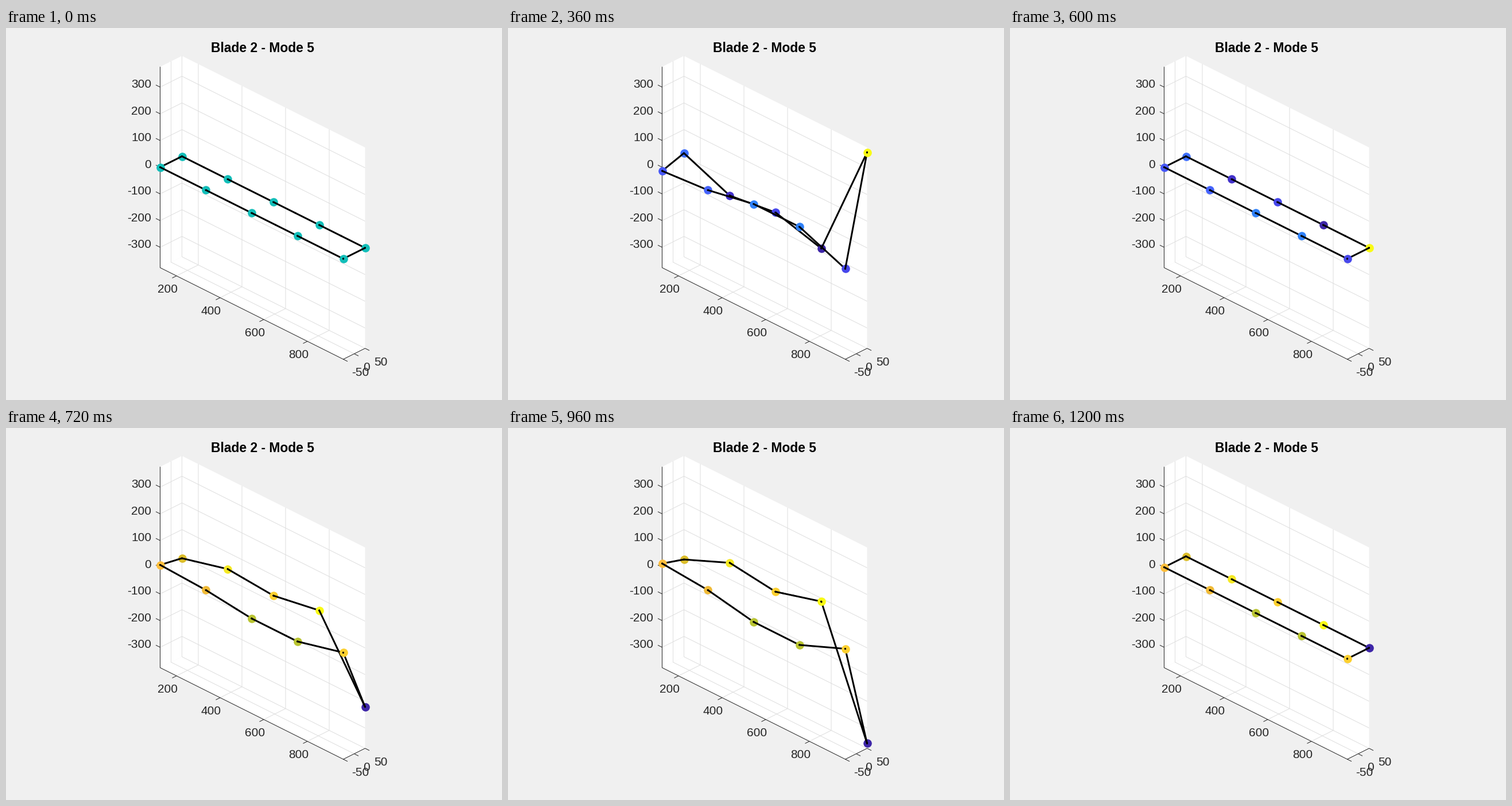
Recreate the animation shown at these times as a matplotlib script. Size 864 by 648 pixels, loop 1.26 s.

```python
import numpy as np
import matplotlib.pyplot as plt
from matplotlib.animation import FuncAnimation

W, H, DPI = 864, 648, 72
STEPS = 21
INK = "#262626"
GRID = "#dedede"
TEAL = "#12beb9"

plt.rcParams["font.family"] = "Liberation Sans"
fig = plt.figure(figsize=(W / DPI, H / DPI), dpi=DPI, facecolor="#f0f0f0")
ax = fig.add_axes([0, 0, 1, 1])
ax.set_xlim(0, W)
ax.set_ylim(H, 0)
ax.axis("off")

# Projected box: a bottom corner and the three edge vectors in pixels.
CORNER = np.array([268.5, 417.5])
EX = np.array([319, 159.5])
EY = np.array([38, -19])
EZ = np.array([0, -350])


def at(x, y, z):
    """Stage position of box fractions x, y, z."""
    return CORNER + x * EX + y * EY + z * EZ


def line(points, color, width=1.0, z=1):
    xs, ys = zip(*points)
    ax.plot(xs, ys, color=color, lw=width, zorder=z, solid_capstyle="butt")


def label(x, middle, text, ha, size=20.83, color=INK, **kw):
    ax.text(x, middle + 0.36 * size, text, ha=ha, va="baseline",
            fontsize=size, color=color, zorder=2, **kw)


def draw_box():
    walls = [
        [(0, 0, 0), (0, 1, 0), (0, 1, 1), (0, 0, 1)],
        [(0, 1, 0), (1, 1, 0), (1, 1, 1), (0, 1, 1)],
        [(0, 0, 0), (1, 0, 0), (1, 1, 0), (0, 1, 0)],
    ]
    for wall in walls:
        ax.fill(*zip(*[at(*p) for p in wall]), color="white", lw=0, zorder=0)

    back = np.array([-7.5, -3.75])
    front = np.array([-7.5, 3.75])
    for k in range(-3, 4):
        z = 0.5 + k * 46.5 / 350
        line([at(0, 0, z), at(0, 1, z), at(1, 1, z)], GRID)
        tick = at(0, 0, z)
        line([tick, tick + back], INK)
        label(253, 236.5 - 46.5 * k, str(100 * k).replace("\u2212", "-"),
              "right")
    for k in range(4):
        x = (28.5 + 76 * k) / 319
        line([at(x, 0, 0), at(x, 1, 0), at(x, 1, 1)], GRID)
        tick = at(x, 0, 0)
        line([tick, tick + front], INK)
        label(281.5 + 75.9 * k, 454 + 37.9 * k, str(200 + 200 * k), "center")
    for k, name in enumerate(["-50", "0", "50"]):
        y = k / 2
        if k:
            line([at(1, y, 0), at(0, y, 0), at(0, y, 1)], GRID)
        tick = at(1, y, 0)
        line([tick, tick - back], INK)
        label(602.5 + 19.2 * k, 599 - 9.4 * k, name, "left")
    line([at(0, 0, 1), at(0, 0, 0), at(1, 0, 0), at(1, 1, 0)], INK, z=1.5)
    label(447.3, 33.5, "Blade 2 - Mode 5", "center", 22.92, "black",
          weight="bold")


draw_box()

# Nodes run along the near edge, then back along the far edge.
ALONG = np.array([0, 1, 2, 3, 4, 4, 3, 2, 1, 0]) / 4
SIDE = np.repeat([0, 1], 5)
SHAPE = np.array([-6.8, 0, 16.4, 16.6, -18.3, 175, -43, -19, -30, 5.8])
REST = np.array([at(x, y, 0.5) for x, y in zip(ALONG, SIDE)])
UP = ["#4758f8", "#4563fd", "#2f81fa", "#2f81fa", "#4747eb",
      "#f9fb15", "#3e26a8", "#4747eb", "#4332cb", "#3e6fff"]
DOWN = ["#febe3c", "#f0ba36", "#b9c431", "#b9c431", "#fcd030",
        "#3e26a8", "#f9fb15", "#fcd030", "#f5e924", "#dcbd29"]
COUNT = len(SHAPE)

layers = [ax.plot([], [], color="black", lw=3, zorder=3 + 2 * k,
                  solid_capstyle="round")[0] for k in range(COUNT + 1)]
dots = [ax.plot([], [], "o", ms=14.6, mew=0, zorder=4 + 2 * k)[0]
        for k in range(COUNT)]


def slices(pos, depth, lo, hi):
    """Parts of the outline whose depth lies between lo and hi."""
    xs, ys = [], []
    for i in range(COUNT):
        a, b = sorted((i, (i + 1) % COUNT), key=lambda n: depth[n])
        span = max(depth[b] - depth[a], 1e-6)
        t0 = max((lo - 0.2 - depth[a]) / span, 0)
        t1 = min((hi + 0.2 - depth[a]) / span, 1)
        if t0 < t1:
            p, q = (pos[a] + t * (pos[b] - pos[a]) for t in (t0, t1))
            xs += [p[0], q[0], np.nan]
            ys += [p[1], q[1], np.nan]
    return xs, ys


def update(n):
    lift = SHAPE * np.sin(2 * np.pi * n / 20)
    pos = REST - np.column_stack([np.zeros(COUNT), lift])
    # Nearness to a viewer 30 degrees above the plane.
    depth = 0.866 * (319 * ALONG - 38 * SIDE) + 0.577 * lift
    order = np.argsort(depth)
    colors = [TEAL] * COUNT if n == 0 else UP if n <= 10 else DOWN

    levels = [-1e4, *depth[order], 1e4]
    for layer, lo, hi in zip(layers, levels, levels[1:]):
        layer.set_data(*slices(pos, depth, lo, hi))
    for dot, i in zip(dots, order):
        dot.set_data([pos[i, 0]], [pos[i, 1]])
        dot.set_color(colors[i])
    return layers + dots


anim = FuncAnimation(fig, update, frames=STEPS, interval=60, repeat=True,
                     repeat_delay=0, blit=False)
plt.show()
```
